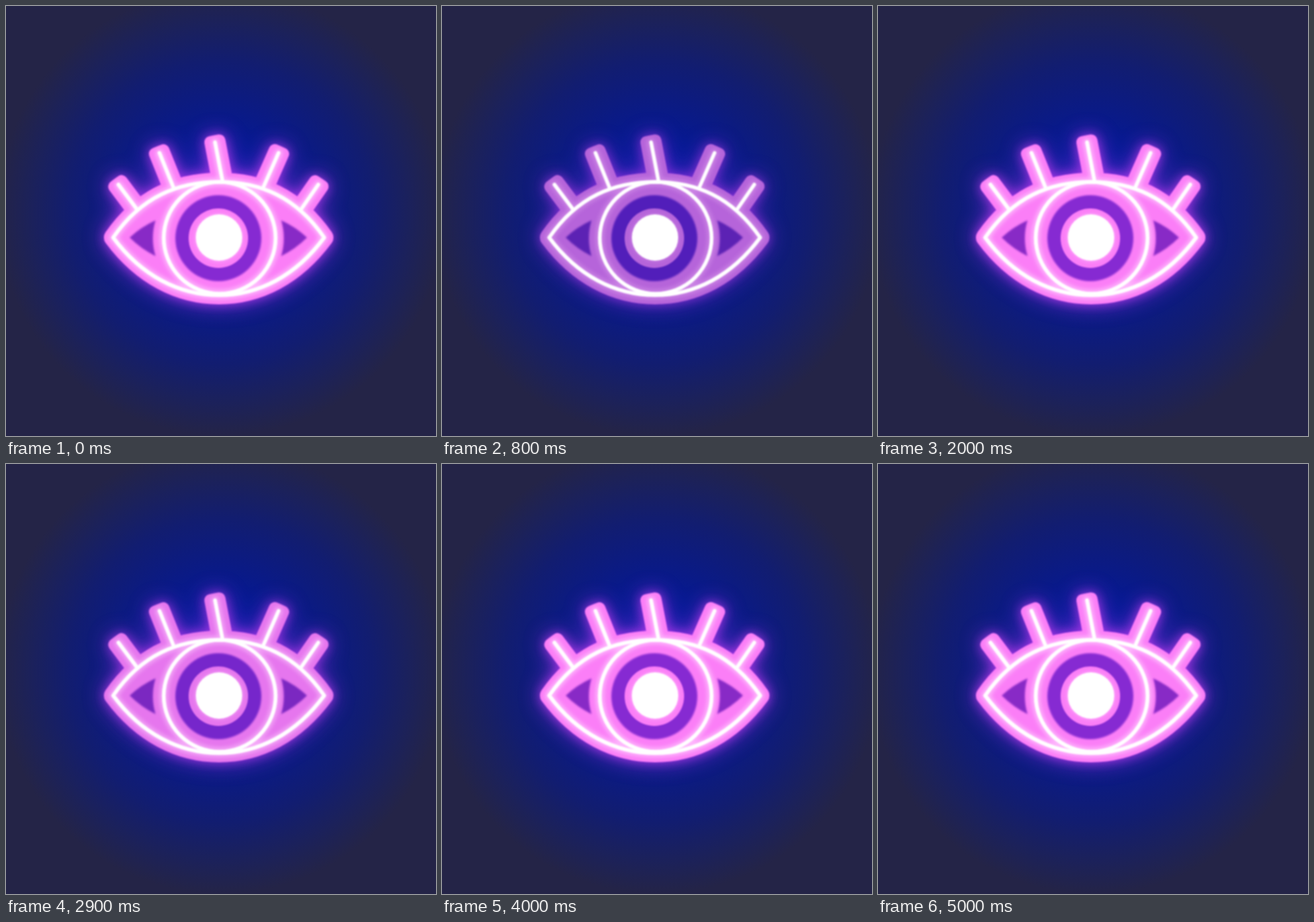
An HTML page for the animation above (5100 ms loop, 650 px wide and 650 px high).

```html
<!DOCTYPE html>
<html lang="en">
<head>
<meta charset="utf-8">
<title>Neon eye</title>
<style>
  html, body { margin: 0; width: 100%; height: 100%; overflow: hidden; background: #242447; }
  svg { display: block; width: 100vw; height: 100vh; }
  .line { fill: none; stroke: currentColor; stroke-linecap: round; stroke-linejoin: round; }
  .solid { fill: currentColor; }
  .glow { color: #b238ec; opacity: var(--glow); }
  .tube { color: var(--tube); }
  .halo { color: #ffd2ff; opacity: var(--halo); }
  .core { color: #fff; }
  .corner { fill: var(--corner); }
  .iris { fill: var(--iris); }
</style>
</head>
<body>
<svg viewBox="0 0 650 650">
  <defs>
    <radialGradient id="night" gradientUnits="userSpaceOnUse" cx="325" cy="312" r="338">
      <stop offset="0" stop-color="#0014a8"/>
      <stop offset=".18" stop-color="#0118a2"/>
      <stop offset=".45" stop-color="#0a1a86"/>
      <stop offset=".68" stop-color="#121d70"/>
      <stop offset=".84" stop-color="#1b215c"/>
      <stop offset="1" stop-color="#242447"/>
    </radialGradient>
    <g id="blurs"></g>

    <path id="almond" d="M162 350C205 288 260 266 322 266S438 288 481 350C438 408 382 437 322 437S205 408 162 350Z"/>
    <path id="corner" d="M187 350Q204 334 226 324Q218 351 226 378Q204 367 187 350Z"/>
    <g id="openTube">
      <use href="#almond" class="line" style="fill:currentColor" stroke-width="28"/>
      <g filter="url(#soft)">
        <use href="#corner" class="corner"/>
        <use href="#corner" class="corner" transform="matrix(-1 0 0 1 642 0)"/>
        <circle class="iris" cx="321" cy="351" r="65"/>
      </g>
      <circle class="solid" cx="321" cy="351" r="45"/>
    </g>
    <g id="openCore">
      <use href="#almond" class="line"/>
      <circle class="line" cx="323" cy="350.5" r="84.5"/>
      <circle class="solid" cx="322" cy="350" r="35"/>
    </g>
    <g id="closedTube">
      <path class="line" style="fill:currentColor" stroke-width="12"
        d="M167 354L183 353C225 400 275 422 324 422S423 400 464 353L480 354C432 415 385 444 324 444S215 415 167 354Z"/>
    </g>
    <g id="closedCore">
      <path class="line" d="M177 355C220 404 272 436 324 436S426 404 469 353"/>
    </g>
  </defs>

  <rect width="650" height="650" fill="url(#night)"/>
  <g id="open"></g>
  <g id="closed"></g>
</svg>
<script>
  const blurs = { wide: 17, near: 8, mist: 3.5, soft: 1 };
  const lashes = {
    open: [[170, 270, 197, 306], [232, 222, 253, 274], [316, 206, 327, 263], [412, 222, 389, 274], [472, 270, 447, 306]],
    closed: [[179, 437, 212, 391], [243, 474, 261, 422], [324, 486, 324, 437], [407, 470, 388, 421], [473, 433, 440, 388]]
  };
  const byId = id => document.getElementById(id);
  const root = document.documentElement.style;

  for (const name in blurs) {
    byId('blurs').innerHTML += `<filter id="${name}" filterUnits="userSpaceOnUse" x="0" y="0" width="650" height="650"
      color-interpolation-filters="sRGB"><feGaussianBlur stdDeviation="${blurs[name]}"/></filter>`;
  }

  // Each lash is a rounded bar with a thin lit line inside it.
  for (const state in lashes) {
    for (const [x, y, bx, by] of lashes[state]) {
      const length = Math.hypot(bx - x, by - y);
      const angle = Math.atan2(by - y, bx - x) * 180 / Math.PI;
      byId(state + 'Tube').insertAdjacentHTML('afterbegin', `<rect class="solid" x="-10.5" y="-16" width="${length + 10.5}"
        height="32" rx="9" transform="translate(${x} ${y}) rotate(${angle})"/>`);
      byId(state + 'Core').innerHTML += `<path class="line" d="M${x} ${y}L${bx} ${by}"/>`;
    }
    const layer = (kind, part, blur, width = 0) =>
      `<g class="${kind}" filter="url(#${blur})"><use href="#${state}${part}" stroke-width="${width}"/></g>`;
    byId(state).innerHTML =
      layer('glow', 'Tube', 'wide') + layer('glow', 'Tube', 'near') + layer('tube', 'Tube', 'soft') +
      layer('halo', 'Core', 'mist', 12) + layer('core', 'Core', 'soft', 5.5);
  }

  const LOOP = 5100, SHUT = 3200, REOPEN = 3900;
  const levels = [[0, 1], [800, 0], [1600, 1], [2300, 1], [2900, .7], [3200, .1], [3400, .05],
    [3700, .6], [3900, .9], [4000, 1], [5100, 1]];

  function levelAt(t) {
    const i = levels.findIndex(([time]) => time > t);
    const [t0, v0] = levels[i - 1], [t1, v1] = levels[i];
    return v0 + (v1 - v0) * (t - t0) / (t1 - t0);
  }
  const mix = (a, b, k) => `rgb(${a.map((v, i) => Math.round(v + (b[i] - v) * k))})`;

  function draw(now) {
    const t = Math.floor(now % LOOP / 100) * 100;
    const level = levelAt(t);
    const shut = t >= SHUT && t < REOPEN;
    byId('open').style.display = shut ? 'none' : '';
    byId('closed').style.display = shut ? '' : 'none';
    root.setProperty('--corner', mix([92, 34, 180], [136, 42, 198], level));
    root.setProperty('--iris', mix([82, 30, 186], [134, 42, 210], level));
    root.setProperty('--tube', mix([182, 100, 218], [251, 126, 247], level));
    root.setProperty('--glow', .55 + .2 * level);
    root.setProperty('--halo', .3 + .4 * level);
    requestAnimationFrame(draw);
  }
  requestAnimationFrame(draw);
</script>
</body>
</html>
```
